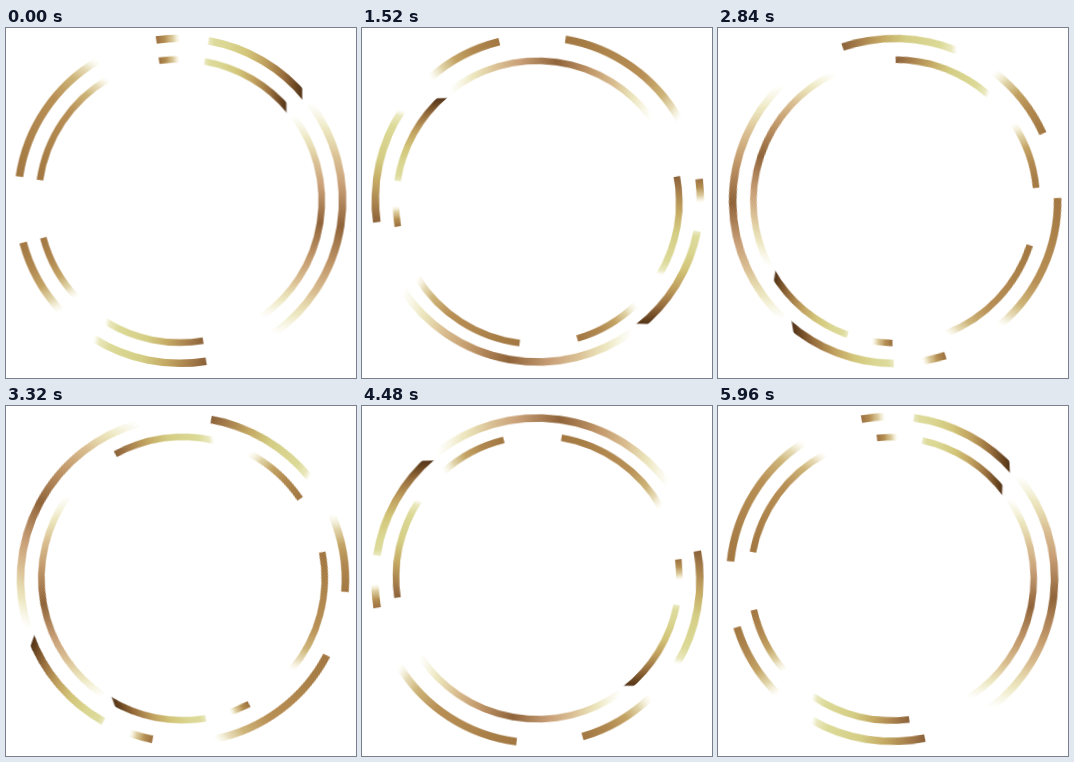
An HTML page for the animation above (6 s loop, 350x350 px).

```html
<!DOCTYPE html>
<html lang="en">
<head>
<meta charset="utf-8">
<title>Golden rings</title>
<style>
  html, body { margin: 0; width: 100%; height: 100%; overflow: hidden; background: #fff; }
  svg { display: block; width: 100vw; height: 100vh; }
  .spin { transform-origin: 0 0; animation: spin 6s linear infinite; }
  .back { animation-direction: reverse; }
  @keyframes spin {
    from { transform: rotate(0deg); }
    to { transform: rotate(360deg); }
  }
</style>
</head>
<body>
<svg viewBox="0 0 350 350">
  <defs id="defs">
    <g id="ring" fill="none" stroke-width="7.6"></g>
  </defs>
  <g transform="translate(175.6 173)">
    <g class="spin"><use href="#ring" transform="translate(-1.5 -.2)"/></g>
    <g class="spin back"><use href="#ring" transform="translate(-1.5 -.1) scale(.872)"/></g>
  </g>
</svg>
<script>
  const R = 162.5;
  const defs = document.getElementById('defs');
  const ring = document.getElementById('ring');

  // Angles are degrees clockwise from the top.
  const point = a => {
    const r = a * Math.PI / 180;
    return [R * Math.sin(r), -R * Math.cos(r)];
  };

  const make = (tag, attrs, parent) => {
    const el = document.createElementNS('http://www.w3.org/2000/svg', tag);
    for (const k in attrs) el.setAttribute(k, attrs[k]);
    return parent.appendChild(el);
  };

  const clear = '#ece6b800';
  // Each arc: start, end, gradient stops (offset and colour), optional horizontal gradient span.
  const arcs = [
    { from: -8.5, to: 0, stops: [0, '#9c7040', .35, '#b48f52', .7, '#d2bc80c0', 1, clear] },
    { from: 10, to: 51, span: [28, 123],
      stops: [0, '#e2e0a8b0', .06, '#dddb9c', .2, '#dad692', .4, '#d3c67a', .6, '#c0a05e', .8, '#966c3c', .92, '#6b4722', .98, '#56361a', 1, '#56361a00'] },
    { from: 53, to: 145,
      stops: [0, clear, .1, '#e4dca4b0', .2, '#dcc498', .32, '#c9a078', .5, '#90643a', .68, '#c39a6c', .8, '#dabf92', .9, '#e4dca4b0', 1, clear] },
    { from: 170.7, to: 212,
      stops: [0, '#8c623a', .15, '#a8804c', .35, '#c5aa64', .55, '#d4cd84', .85, '#dcda98', .95, '#e2e0a8c0', 1, clear] },
    { from: 255, to: 227, stops: [0, '#a27742', .35, '#b18950', .6, '#c3a364', .8, '#d6c58cc0', 1, clear] },
    { from: 278.5, to: 329.5, stops: [0, '#a27742', .3, '#ad844b', .6, '#b88f55', .8, '#cdb478', .9, '#dac994b0', 1, clear] }
  ];

  arcs.forEach(({ from, to, stops, span }, i) => {
    const p = point(from), q = point(to);
    const [x1, y1, x2, y2] = span ? [span[0], 0, span[1], 0] : [...p, ...q];
    const grad = make('linearGradient',
      { id: 'gold' + i, gradientUnits: 'userSpaceOnUse', x1, y1, x2, y2 }, defs);
    for (let s = 0; s < stops.length; s += 2) {
      make('stop', { offset: stops[s], 'stop-color': stops[s + 1] }, grad);
    }
    const sweep = to > from ? 1 : 0;
    make('path', { d: `M${p}A${R} ${R} 0 0 ${sweep} ${q}`, stroke: `url(#gold${i})` }, ring);
  });
</script>
</body>
</html>
```
